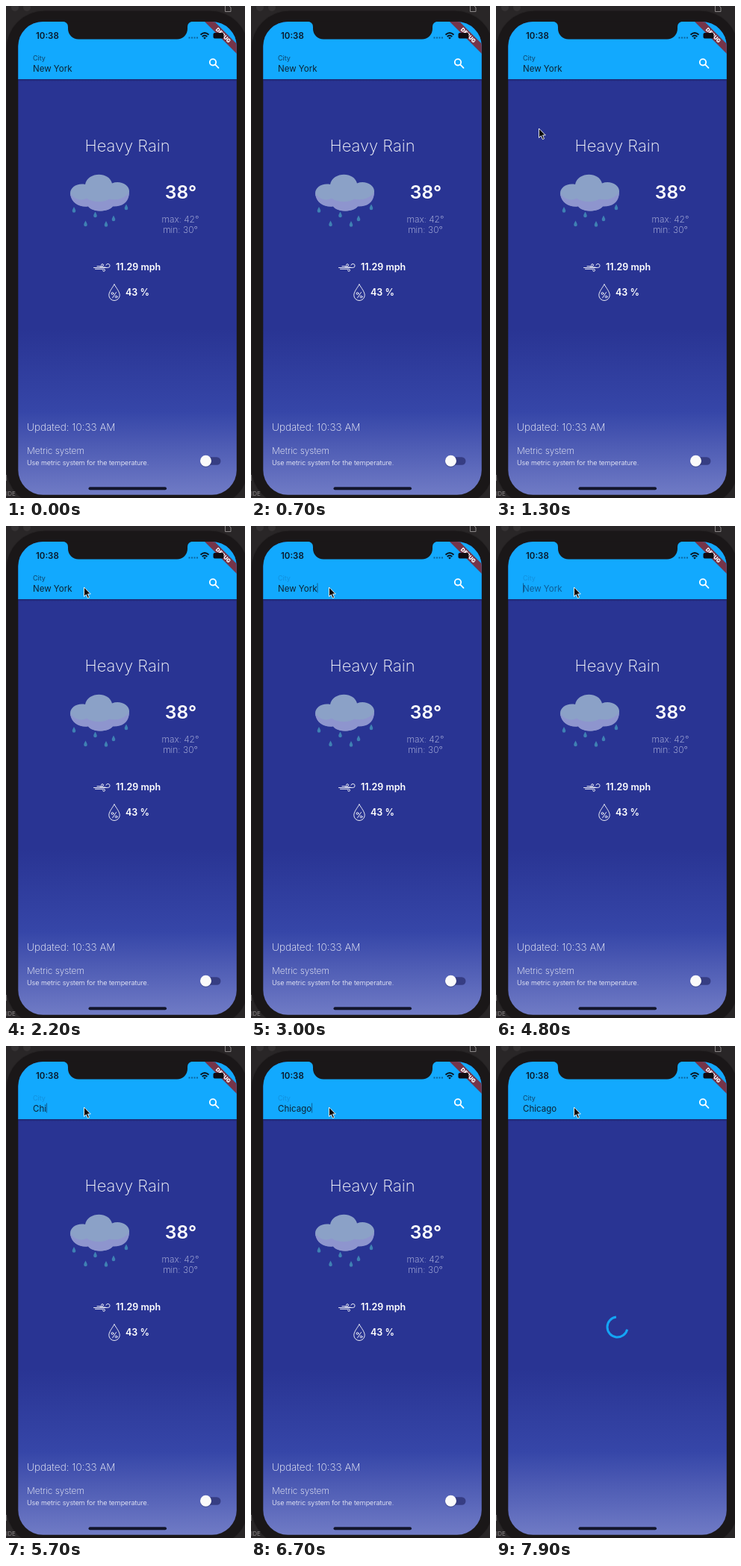
An HTML page that plays this animation: 320 by 659 pixels, repeating every 8 s.

```html
<!DOCTYPE html>
<html lang="en">
<head>
<meta charset="utf-8">
<title>Weather app</title>
<style>
  html, body { margin: 0; width: 100%; height: 100%; overflow: hidden; background: #292627; }
  svg { display: block; width: 100vw; height: 100vh; }
  text { font-family: Inter, "Open Sans", sans-serif; fill: #fff; white-space: pre; }
  .light { font-weight: 200; }
  .bold { font-weight: 600; }
  .mid { text-anchor: middle; }
  .line { fill: none; stroke: #fff; stroke-linecap: round; stroke-linejoin: round; }
</style>
</head>
<body>
<svg viewBox="0 0 320 659">
  <defs>
    <linearGradient id="sky" gradientUnits="userSpaceOnUse" x1="0" y1="98" x2="0" y2="655">
      <stop offset=".6" stop-color="#293493"/>
      <stop offset=".8" stop-color="#3646a8"/>
      <stop offset="1" stop-color="#707bc5"/>
    </linearGradient>
    <linearGradient id="shade" x2="0" y2="1">
      <stop stop-color="#10164d" stop-opacity=".55"/>
      <stop offset="1" stop-color="#10164d" stop-opacity="0"/>
    </linearGradient>
    <clipPath id="screen"><rect x="16.300" y="21" width="292.500" height="633.700" rx="33"/></clipPath>
    <path id="rain" d="M0 -4C1 -2 2.3 0 2.3 1.4A2.3 2.3 0 0 1 -2.3 1.4C-2.3 0 -1 -2 0 -4Z"/>
  </defs>

  <!-- desktop and phone body -->
  <g fill="#353233"><circle cx="12" cy="2" r="5"/><circle cx="28" cy="2" r="5"/></g>
  <path d="M293.500 -1V7.500H301V2L298 -1" fill="none" stroke="#8b8788"/>
  <rect x="0" y="6" width="325" height="664" rx="52" fill="#1a1718" stroke="#262324"/>
  <text x="0" y="656" font-size="8" style="fill:#8d898a">IDE</text>
  <path d="M0 628V636" stroke="#aaa6a7"/>

  <g clip-path="url(#screen)">
    <rect x="16" y="21" width="293" height="635" fill="url(#sky)"/>
    <rect x="16" y="98" width="293" height="3" fill="url(#shade)"/>
    <rect x="16" y="21" width="293" height="77" fill="#12a9fe"/>
    <g transform="translate(309 21) rotate(45)">
      <rect x="-45" y="21" width="90" height="9.400" fill="#75354a"/>
      <text class="mid" y="28.200" font-size="7.200" font-weight="900">DEBUG</text>
    </g>
  </g>
  <path d="M75 20.500Q83 21 83 28V30.500A14 14 0 0 0 97 44.500H229A14 14 0 0 0 243 30.500V28Q243 21 251 20.500Z" fill="#1a1718"/>

  <!-- status bar -->
  <text class="bold" x="40" y="43.800" font-size="11.500" style="fill:#0b1a2c">10:38</text>
  <path d="M244.500 42.500H257" stroke="#0d659d" stroke-width="2" stroke-dasharray="2 1.500"/>
  <g fill="none" stroke="#08131d" stroke-width="1.800">
    <path d="M260.500 38.500Q266 33.500 271.500 38.500M262.700 41Q266 38 269.300 41"/>
  </g>
  <path d="M266 44.500L264.200 42.500Q266 41 267.800 42.500Z" fill="#08131d"/>
  <rect x="277.500" y="36" width="14" height="7.500" rx="2" fill="#100c12"/>

  <!-- search field -->
  <text id="label" x="36" y="72.700" font-size="9">City</text>
  <text id="hint" x="36" y="87.600" font-size="11.500" style="fill:#0d5c96">New York</text>
  <text id="field" x="36" y="87.600" font-size="11.500" style="fill:#0c2233">New York</text>
  <rect id="caret" y="76.500" width="1" height="13" fill="#0f5f96"/>
  <g class="line" stroke-width="1.800"><circle cx="277" cy="75.300" r="4.200"/><path d="M280.300 78.600L284.500 82.800"/></g>

  <g id="weather">
    <text class="light mid" x="162.500" y="195" font-size="22">Heavy Rain</text>
    <path d="M86 251C86 243 95 237 106 239C109 222 138 221 142 237.500C153 233 166 240 165 249C164 262 157 268 143 268C138 276 116 277 110 268C96 270 87 262 86 251Z" fill="#8ba1c7"/>
    <path d="M86 251C94 262 104 260 108 257.500C116 264 132 263 138 258.500C150 261 161 257 165 249C165 262 157 269 143 268.500C138 276 116 277 110 268.500C96 270 87 262 86 251Z" fill="#8e95ce"/>
    <g id="drops" fill="#3f80b3"></g>
    <text class="bold mid" x="234" y="257.700" font-size="24.500">38°</text>
    <g class="light mid" font-size="12">
      <text x="233.500" y="290" style="fill:#c4c8e8">max: 42°</text>
      <text x="233.500" y="304.200" style="fill:#c4c8e8">min: 30°</text>
    </g>
    <g class="line" stroke-width=".9">
      <path d="M117.500 350.500H136.500A2.600 2.600 0 1 0 134 347M119.500 352.300H131A1.500 1.500 0 1 1 129.500 354M122 348.600H129A1.500 1.500 0 1 0 127.500 347M126 350H133"/>
      <path d="M145 373C148 378 152.200 383 152.200 387.300A7.200 7.200 0 0 1 137.800 387.300C137.800 383 142 378 145 373Z"/>
      <path d="M147.500 383.500L142.500 391"/>
      <circle cx="142.500" cy="385" r="1.400"/><circle cx="147.500" cy="389.500" r="1.400"/>
    </g>
    <g class="bold" font-size="12.500">
      <text x="147" y="353.800">11.29 mph</text>
      <text x="160" y="387.700">43 %</text>
    </g>
    <g class="light">
      <text x="28" y="568.700" font-size="13.600">Updated: 10:33 AM</text>
      <text x="28" y="599.700" font-size="12">Metric system</text>
      <text x="28" y="614.800" font-size="9" font-weight="300">Use metric system for the temperature.</text>
    </g>
    <rect x="262" y="604.200" width="25.500" height="10.500" rx="5.250" fill="#363d83"/>
    <circle cx="267.500" cy="610.200" r="7.700" fill="#1c2359" opacity=".35"/>
    <circle cx="267.500" cy="609.300" r="7.500" fill="#fafafa"/>
  </g>

  <path id="spinner" fill="none" stroke="#14a5f5" stroke-width="3"/>
  <rect x="110.500" y="644.300" width="104.500" height="4" rx="2" fill="#12152b"/>
  <path id="mouse" d="M0 0V12.500L2.800 9.800L4.900 14.600L7 13.700L5 9H8.800Z" fill="#090909" stroke="#fff" stroke-width=".9"/>
</svg>

<script>
const LOOP = 8000, STEP = 100;
const FOCUS = 2800, ERASE = 3400, ERASE_GAP = 150, TYPE = 5300, TYPE_GAP = 180, SUBMIT = 7450;
const OLD = "New York", NEW = "Chicago";
const [label, hint, field, caret, weather, spinner, mouse, drops] =
  ["label", "hint", "field", "caret", "weather", "spinner", "mouse", "drops"].map(id => document.getElementById(id));

drops.innerHTML = [[91, 273], [161, 269.5], [119.5, 279.5], [144, 284.5], [106.5, 291.5], [134, 292]]
  .map(([x, y]) => `<use href="#rain" x="${x}" y="${y}"/>`).join("");

const clamp = v => Math.min(1, Math.max(0, v));
const mix = (a, b, k) => a + (b - a) * k;
const show = (el, on) => el.setAttribute("visibility", on ? "visible" : "hidden");

// cubic-bezier(.4, 0, .2, 1)
function ease(x) {
  let lo = 0, hi = 1, u = x;
  for (let i = 0; i < 20; i++) {
    u = (lo + hi) / 2;
    if (1.2 * u * (1 - u) ** 2 + .6 * u * u * (1 - u) + u ** 3 < x) lo = u; else hi = u;
  }
  return u * u * (3 - 2 * u);
}

// [time, x, y] of the pointer tip
const trail = [[1000, 3, 215], [1300, 57.5, 164], [2000, 104.5, 82]];
function drawMouse(t) {
  show(mouse, t >= trail[0][0]);
  const i = t < trail[1][0] ? 0 : 1;
  const [a, b] = [trail[i], trail[i + 1]];
  const k = clamp((t - a[0]) / (b[0] - a[0])), e = i ? ease(k) : k;
  mouse.setAttribute("transform", `translate(${mix(a[1], b[1], e)} ${mix(a[2], b[2], e)})`);
}

// keys pressed by time t, at a steady pace
const keys = (t, start, gap, max) => Math.min(max, Math.max(0, Math.floor((t - start) / gap) + 1));

function drawField(t) {
  const erased = keys(t, ERASE, ERASE_GAP, OLD.length);
  const typed = keys(t, TYPE, TYPE_GAP, NEW.length);
  const text = typed ? NEW.slice(0, typed) : OLD.slice(0, OLD.length - erased);
  field.textContent = text;

  const emptied = ERASE + (OLD.length - 1) * ERASE_GAP;
  hint.setAttribute("opacity", text ? 0 : clamp((t - emptied) / 200));

  const focus = clamp((t - FOCUS) / 200) - clamp((t - SUBMIT) / 200);
  label.style.fill = `rgb(${mix(14, 18, focus)},${mix(66, 145, focus)},${mix(104, 222, focus)})`;

  const lastKey = typed ? TYPE + (typed - 1) * TYPE_GAP
    : erased ? ERASE + (erased - 1) * ERASE_GAP : FOCUS;
  show(caret, t >= FOCUS && t < SUBMIT && (t - lastKey) % 1000 < 500);
  caret.setAttribute("x", 36 + (text ? field.getComputedTextLength() : 0));
}

function drawSpinner(t) {
  const on = t >= SUBMIT;
  show(weather, !on);
  show(spinner, on);
  if (!on) return;
  const s = t - SUBMIT, p = s / 1333 % 1;
  const head = ease(clamp(p * 2)), tail = ease(clamp(p * 2 - 1));
  const start = -90 + tail * 270 + s / 2222 * 360 + p * 90;
  const sweep = Math.max(1, (head - tail) * 270);
  const at = deg => {
    const a = deg * Math.PI / 180;
    return `${162.5 + 13.5 * Math.cos(a)} ${376.5 + 13.5 * Math.sin(a)}`;
  };
  spinner.setAttribute("d", `M${at(start)}A13.5 13.5 0 ${+(sweep > 180)} 1 ${at(start + sweep)}`);
}

const begin = performance.now();
function frame() {
  const t = Math.floor((performance.now() - begin) % LOOP / STEP) * STEP;
  drawMouse(t);
  drawField(t);
  drawSpinner(t);
  requestAnimationFrame(frame);
}
frame();
</script>
</body>
</html>
```
